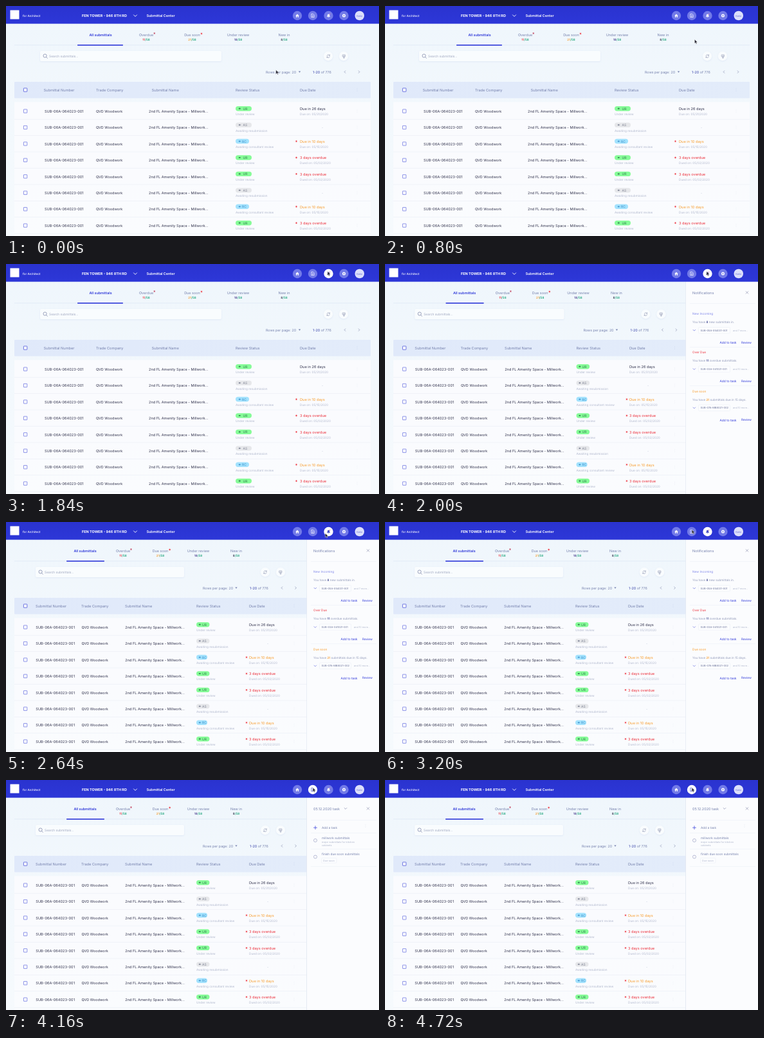
Recreate the animation shown at these times as an HTML page. Size 580 by 358 pixels, loop 4800 ms.

```html
<!DOCTYPE html>
<html lang="en">
<head>
<meta charset="utf-8">
<title>Submittal center</title>
<style>
  html, body { margin: 0; width: 100%; height: 100%; overflow: hidden; background: #f1f7fc; }
  svg { display: block; width: 100vw; height: 100vh; }
  text { font-family: Inter, "Open Sans", sans-serif; white-space: pre; text-rendering: geometricPrecision; }
</style>
</head>
<body>
<svg id="stage" viewBox="0 0 580 358" xmlns="http://www.w3.org/2000/svg">
  <defs>
    <linearGradient id="page" x2="0" y2="1">
      <stop offset="0" stop-color="#eff6fc"/>
      <stop offset="1" stop-color="#f6fafd"/>
    </linearGradient>
    <linearGradient id="bar" x2="0" y2="1">
      <stop offset="0" stop-color="#2a33cf"/>
      <stop offset="1" stop-color="#2d37d8"/>
    </linearGradient>
    <linearGradient id="heads">
      <stop offset="0" stop-color="#e0e9fa"/>
      <stop offset="1" stop-color="#e3ecfa"/>
    </linearGradient>
    <filter id="soft" x="-20%" y="-40%" width="140%" height="200%">
      <feDropShadow dx="0" dy=".8" stdDeviation="1.2" flood-color="#8fa6d8" flood-opacity=".2"/>
    </filter>
  </defs>
</svg>
<script>
const LOOP = 4800;
const C = {
  ink: '#34354f', head: '#7580ad', soft: '#b0b7cd', blue: '#2f39d9', line: '#e9edf5', icon: '#8188a8',
  red: '#ec2f3a', orange: '#f79c2c', green: '#1fa57c'
};
const stage = document.getElementById('stage');
const movers = [];

function add(parent, tag, attrs = {}) {
  const node = document.createElementNS(stage.namespaceURI, tag);
  for (const key in attrs) node.setAttribute(key, attrs[key]);
  return parent.appendChild(node);
}

const rect = (p, x, y, width, height, fill, more) => add(p, 'rect', { x, y, width, height, fill, ...more });
const circle = (p, cx, cy, r, fill, more) => add(p, 'circle', { cx, cy, r, fill, ...more });
const stroke = (p, d, color, w = .8) => add(p, 'path', {
  d, fill: 'none', stroke: color, 'stroke-width': w, 'stroke-linecap': 'round', 'stroke-linejoin': 'round'
});

// Text centred vertically on y; str may be a list of [text, colour, weight].
function text(p, x, y, str, size, fill, weight = 400, anchor = 'start') {
  const node = add(p, 'text', {
    x, y: y + size * .36, fill, 'font-size': size, 'font-weight': weight, 'text-anchor': anchor
  });
  if (typeof str === 'string') node.textContent = str;
  else for (const [part, color = fill, w = weight] of str) {
    add(node, 'tspan', { fill: color, 'font-weight': w }).textContent = part;
  }
  return node;
}

// Group that slides from x = a (wide layout) to x = b (narrow layout).
function slide(a, b, p = main) {
  const g = add(p, 'g');
  movers.push(k => g.setAttribute('transform', `translate(${a + (b - a) * k} 0)`));
  return g;
}

function stretch(node, a, b) {
  movers.push(k => node.setAttribute('width', a + (b - a) * k));
  return node;
}

const label = (a, b, ...rest) => text(slide(a, b), 0, ...rest);
const star = (a, b, y, color) => stroke(slide(a, b),
  `M0 ${y - 1}v2M-.9 ${y - .5}l1.8 1M.9 ${y - .5}l-1.8 1`, color, .7);
const dots = (p, x, y, color) => {
  for (const d of [-2, 0, 2]) circle(p, x, y + d, .4, color);
};
const chevron = (p, x, y, s, color, w) => stroke(p, `M${x - s} ${y - s / 2}l${s} ${s}l${s} ${-s}`, color, w);
const checkbox = (y, w) => rect(main, 27.4, y - 2.7, 5.4, 5.4, '#fcfdff', {
  rx: .4, stroke: '#5f67df', 'stroke-width': w
});

rect(stage, 0, 0, 580, 358, 'url(#page)');
const main = add(stage, 'g');

function drawTabs() {
  stretch(rect(main, 13, 60.6, 554, .6, '#d6e1f0'), 554, 455);
  stretch(rect(slide(111, 94), 0, 60, 71, 1.7, '#3e47dc', { rx: .6 }), 71, 59);
  label(147, 123, 44.8, 'All submittals', 5.4, C.blue, 600, 'middle');
  const tabs = [
    [218, 182, 'Overdue', '11', C.red], [289.5, 240, 'Due soon', '21', C.orange],
    [361, 299, 'Under review', '18', '#4b3f8f'], [432.5, 358, 'New in', '8', C.ink]
  ];
  for (const [a, b, name, count, color] of tabs) {
    label(a, b, 44.8, name, 5.5, C.head, 400, 'middle');
    label(a, b, 52.6, [[count, color], ['/58', C.green]], 4.6, color, 600, 'middle');
  }
  star(230.8, 194.5, 42.5, '#c2445f');
  star(304, 254.6, 43, C.red);
}

function drawTools() {
  const box = rect(slide(53, 46), 0, 70, 282, 16, '#f9fcfe', { rx: 2, filter: 'url(#soft)' });
  stretch(box, 282, 231);
  const find = slide(61, 54);
  circle(find, -.4, 77.5, 2.6, 'none', { stroke: '#727a9f', 'stroke-width': .7 });
  stroke(find, 'M1.6 79.5l1.8 1.8', '#727a9f', .7);
  label(67, 60, 78.4, 'Search submittals...', 4.9, '#a0a8c0');

  for (const x of [501, 525]) {
    circle(slide(x, x - 98), 0, 78, 7.2, '#f9fcfe', { filter: 'url(#soft)' });
  }
  stroke(slide(501.2, 403), 'M-2.1 77.5a2.2 2.2 0 0 1 4.1-.5M2.1 78.8a2.2 2.2 0 0 1-4.1 .5M2.2 75.7v1.4h-1.3M-2.2 80.5v-1.4h1.3', C.icon, .55);
  stroke(slide(525.5, 427), 'M-1.9 76h3.8v2.7h-3.8zM0 77v4M-1.2 80l1.2 1.3l1.2-1.3', C.icon, .55);

  label(404, 306, 102.7, 'Rows per page: 20', 5.3, C.head);
  add(slide(456.5, 358), 'path', { d: 'M-1.7 101.6h3.4l-1.7 2.1z', fill: C.head });
  label(477, 379, 102.7, [['1-20', '#4e58b4', 500], [' of 776']], 5.35, C.head);
  stroke(slide(527, 429), 'M.8 100.9l-1.7 1.7l1.7 1.7', '#727a9f', .6);
  stroke(slide(549, 450.5), 'M-.8 100.9l1.7 1.7l-1.7 1.7', '#727a9f', .6);
}

function drawTable() {
  stretch(rect(main, 13, 118, 554, 25.5, 'url(#heads)', { rx: 1 }), 554, 455);
  checkbox(130.6, .9);
  const heads = [
    [58.5, 46, 'Submittal Number'], [140, 117, 'Trade Company'], [226.5, 185, 'Submittal Name'],
    [357, 296, 'Review Status'], [457, 378, 'Due Date']
  ];
  for (const [a, b, name] of heads) label(a, b, 130.8, name, 5.65, C.head);
  dots(slide(546, 448), 0, 130.6, '#b9c3de');

  const status = {
    UR: ['Under review', '#86fb98', '#2c7a49', 25, 20.5],
    AS: ['Awaiting resubmission', '#e6e7ea', '#7d8294', 25, 20.5],
    RC: ['Awaiting consultant review', '#a3e2fd', '#3a8fca', 21, 17]
  };
  const due = {
    far: ['Due in 26 days', 'Due on: 05/31/2020', C.ink],
    near: ['Due in 10 days', 'Due on: 05/15/2020', C.orange],
    late: ['3 days overdue', 'Dued on: 05/02/2020', C.red]
  };
  const rows = 'UR far,AS,RC near,UR late,UR late,AS,RC near,UR late'.split(',');
  stretch(rect(main, 13, 149.5, 554, 209, '#fbfcfe', { opacity: .92 }), 554, 455);

  rows.forEach((row, i) => {
    const y = 163.5 + i * 25.43;
    const [code, when] = row.split(' ');
    const [note, fill, color, wide, narrow] = status[code];
    stretch(rect(main, 13, y + 12.4, 554, .6, C.line), 554, 455);
    checkbox(y + .1, .7);
    label(60, 46.3, y + .3, 'SUB-06A-064023-001', 5.65, C.ink);
    label(140, 117.5, y + .3, 'QVD Woodwork', 5.5, C.ink);
    label(222, 185.3, y + .3, '2nd FL Amenity Space - Millwork...', 5.6, C.ink);

    stretch(rect(slide(357, 296), 0, y - 7.5, wide, 7.4, fill, { rx: 3.7 }), wide, narrow);
    const mark = slide(363.3, 301.3);
    circle(mark, 0, y - 3.8, 1.1, color);
    stroke(mark, `M-1.6 ${y - 3.8}h3.2`, color, .5);
    label(code === 'RC' ? 367 : 368.5, 305, y - 3.6, code, 5, color);
    label(357, 296, y + 5, note, 4.7, C.soft);

    if (when) {
      const [title, sub, tint] = due[when];
      label(457, 378, y - 3.4, title, 5.65, tint);
      label(457, 378, y + 5, sub, 4.7, C.soft);
      if (when !== 'far') star(451.5, 374, y - 3.8, C.red);
    } else {
      label(491, 406, y + .5, '-', 4.7, C.soft);
    }
    dots(slide(546, 448), 0, y, '#dfe3ee');
  });
}

function newPanel() {
  const g = add(stage, 'g', { opacity: 0 });
  rect(g, 467.3, 27.5, .7, 331, '#e3e8f2');
  rect(g, 468, 27.5, 112, 331, '#fbfcfe');
  stroke(g, 'M561.2 42.6l3.6 3.6M564.8 42.6l-3.6 3.6', C.icon, .6);
  return g;
}

const divider = (p, y) => rect(p, 474, y, 102, .5, C.line);
const chip = (p, x, y, w, h) => rect(p, x, y, w, h, '#fcfdff', { rx: 1, stroke: '#e6eaf3', 'stroke-width': .5 });

function drawNotices() {
  const g = newPanel();
  text(g, 478, 44.6, 'Notifications', 5.6, C.head);
  divider(g, 61);
  const list = [
    ['New Incoming', '#7f86e9', '8', ' new submittals in.', 'SUB-05A-054031-001', 'and 7 more...', '#3d4690'],
    ['Over Due', C.red, '11', ' overdue submittals.', 'SUB-03A-041021-001', 'and 10 more...', '#3d4690'],
    ['Due soon', C.orange, '21', ' submittals due in 15 days.', 'SUB-07A-MB8021-002', 'and 10 more...', C.orange]
  ];
  list.forEach(([title, color, n, rest, code, more, tint], i) => {
    const y = 77 + i * 60.4;
    text(g, 478, y + .3, title, 4.75, color);
    text(g, 478, y + 13.2, [['You have '], [n, tint, 600], [rest]], 4.65, '#8f98b8');
    chevron(g, 480.8, y + 26.2, 1.8, '#5059d8', .6);
    chip(g, 487.5, y + 21.5, 49, 9.4);
    text(g, 490.5, y + 26.2, code, 4, '#656d95');
    text(g, 541, y + 26.2, more, 3.8, C.soft);
    text(g, 520.5, y + 45, 'Add to task', 4.85, C.blue);
    text(g, 554, y + 45, 'Review', 4.7, C.blue);
    if (i < 2) divider(g, y + 52);
  });
  return g;
}

function drawTasks() {
  const g = newPanel();
  text(g, 478, 44.6, '05.12.2020 task', 5.5, C.head);
  chevron(g, 528, 44.4, 1.9, '#727a9f', .6);
  divider(g, 62);
  stroke(g, 'M478.5 74.2h5M481 71.7v5', C.blue, .7);
  text(g, 491, 74.4, 'Add a task', 4.8, C.head);
  dots(g, 559, 71.5, '#d3d8e7');
  divider(g, 82);
  const ring = y => circle(g, 481, y, 2.5, '#fff', { stroke: '#8a90bc', 'stroke-width': .6 });
  ring(94);
  text(g, 491, 90.3, 'millwork submittals', 4.8, C.head);
  text(g, 491, 96.8, 'major submittals for kitchen', 3.9, C.soft);
  text(g, 491, 101.5, 'cabinets', 3.9, C.soft);
  divider(g, 107.5);
  ring(119.6);
  text(g, 491, 115.6, 'finish due soon submittals', 4.75, C.head);
  chip(g, 490.5, 121.6, 23.5, 7.6);
  text(g, 493, 125.6, 'Due soon', 4, C.soft);
  divider(g, 134);
  return g;
}

function drawBar() {
  rect(stage, 0, 0, 580, 27.6, 'url(#bar)');
  rect(stage, 6.5, 6.5, 14, 14, '#fff');
  text(stage, 26, 15.5, 'for Architect', 4.6, '#fff', 500);
  text(stage, 118, 15.3, 'FEN TOWER - 946 8TH RD', 5.5, '#fff', 700);
  chevron(stage, 201, 15.1, 2.5, '#fff', .9);
  text(stage, 218.5, 15.3, 'Submittal Center', 5.45, '#fff', 600);

  const icons = [
    [453, 'M-2.8 .2l2.8-2.7l2.8 2.7h-.8v2.5h-1.3v-1.7h-1.4v1.7h-1.3v-2.5z', true],
    [477, 'M-2.2-2.6h2.9l1.5 1.5v3.7h-4.4zM-1 0h2M-1 1.2h1.5', false],
    [501.5, 'M-2.6 1.7c1-.8.9-1.9 1-2.6a1.6 1.6 0 0 1 3.2 0c.1.7 0 1.8 1 2.6zM-.7 2.2h1.4v.6h-1.4z', true],
    [525.5, 'M2.5 0a2.5 2.5 0 1 1-5 0a2.5 2.5 0 1 1 5 0M1 0a1 1 0 1 0-2 0a1 1 0 1 0 2 0', true]
  ];
  const buttons = icons.map(([x, d, solid]) => {
    const g = add(stage, 'g', { transform: `translate(${x} 15)` });
    const disc = circle(g, 0, 0, 7.2, '');
    const glyph = add(g, 'path', { d, 'stroke-width': solid ? 0 : .7, 'fill-rule': 'evenodd' });
    return on => {
      const color = on ? '#4a52c4' : '#fff';
      disc.setAttribute('fill', on ? '#fff' : '#727ae8');
      glyph.setAttribute('fill', solid ? color : 'none');
      glyph.setAttribute('stroke', color);
    };
  });
  circle(stage, 503.6, 12.6, .8, '#e58ba6');
  circle(stage, 549.8, 15, 7.3, '#dcdffb');
  text(stage, 549.8, 15.1, 'Kelin', 3.9, '#6a71d6', 400, 'middle');
  return buttons;
}

drawTabs();
drawTools();
drawTable();
const notices = drawNotices();
const tasks = drawTasks();
const [setHome, setTask, setBell, setGear] = drawBar();
setHome(false);
setGear(false);
const cursor = add(stage, 'path', {
  d: 'M0 0v6.2l1.5-1.3l1 2.3l1-.5l-1-2.2h2z',
  fill: '#23232f', stroke: '#fff', 'stroke-width': .4
});

// time, x, y of the pointer
const path = [
  [0, 419.8, 99.6], [200, 419.8, 99.6], [800, 481.4, 52], [1280, 500, 11.5],
  [2320, 500, 11.5], [2600, 496.4, 17.5], [2680, 496.4, 17.5], [2860, 477.2, 12], [LOOP, 477.2, 12]
];
const clamp = v => Math.min(1, Math.max(0, v));
const smooth = v => v * v * (3 - 2 * v);
const easeOut = v => 1 - (1 - v) ** 2;

function render(t) {
  const open = easeOut(clamp((t - 1845) / 185));
  const swap = clamp((t - 3460) / 80);
  movers.forEach(move => move(open));
  notices.setAttribute('opacity', clamp(open * 1.05));
  tasks.setAttribute('opacity', swap);
  setBell(t >= 1800 && t < 3480);
  setTask(t >= 3480);

  const i = path.findIndex(([end]) => t < end);
  const [t0, x0, y0] = path[i - 1], [t1, x1, y1] = path[i];
  const k = smooth((t - t0) / (t1 - t0));
  cursor.setAttribute('transform', `translate(${x0 + (x1 - x0) * k} ${y0 + (y1 - y0) * k})`);
}

const start = performance.now();
function tick() {
  render((performance.now() - start) % LOOP);
  requestAnimationFrame(tick);
}
tick();
</script>
</body>
</html>
```
